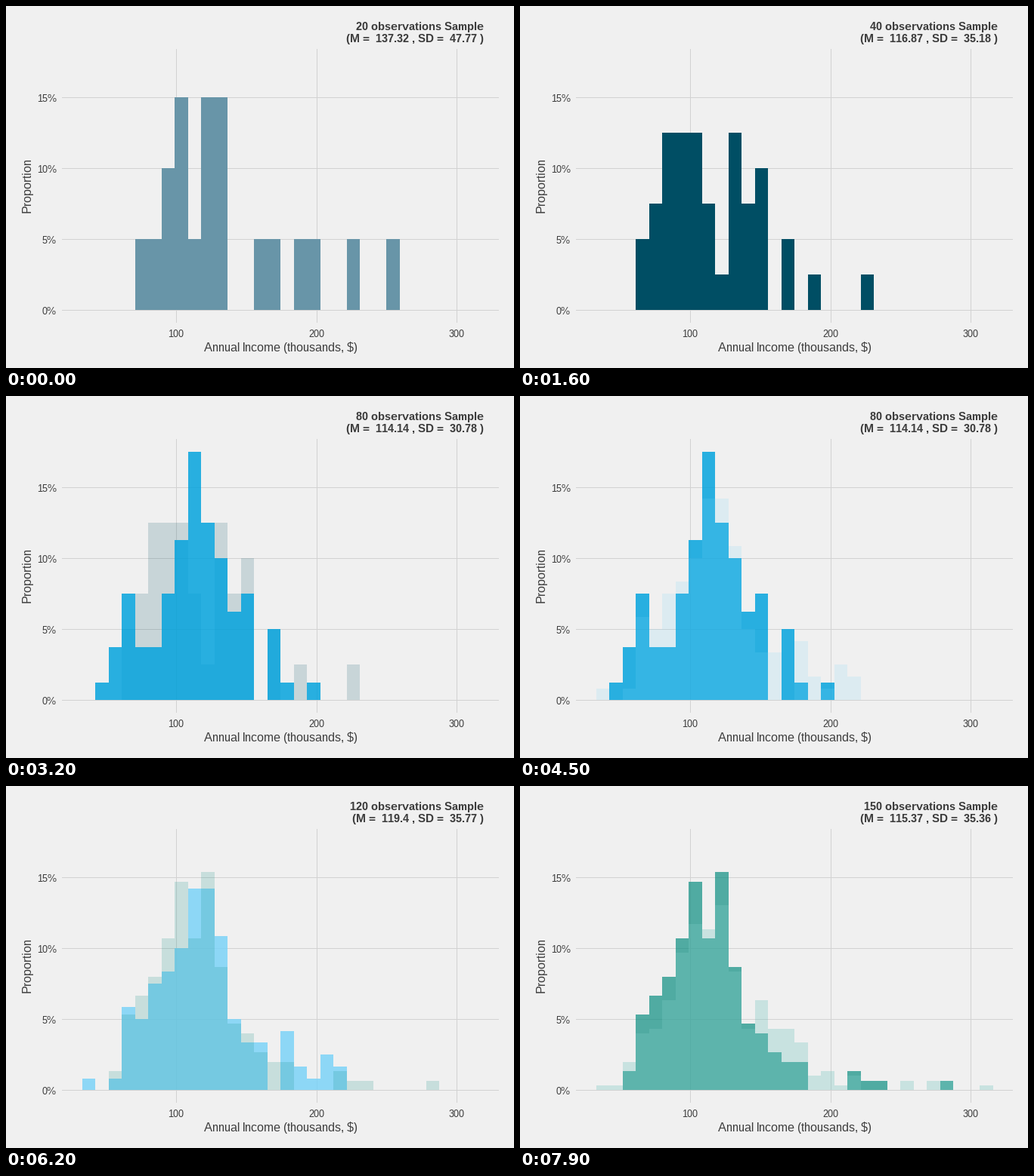
Write a matplotlib script that moves like this. It is 672x480 px and loops after 8000 ms.

```python
import matplotlib as mpl
import matplotlib.pyplot as plt
import numpy as np
from matplotlib.animation import FuncAnimation
from matplotlib.patches import Rectangle

mpl.rcParams.update({
    "font.family": "Liberation Sans",
    "text.hinting": "native",
    "text.hinting_factor": 1,
    "toolbar": "None",
})

W, H, DPI = 672, 480, 96
BG, GRID, INK = "#f0f0f0", "#d2d2d2", "#3c3c3c"
X0, BIN = 100.5, 17.5        # left edge of the first bin, bin width
Y0, PER = 403.25, 18.84      # zero line, pixels per percent
FPS_MS, FRAMES, FADE = 100, 80, 6
STARTS = [11, 28, 45, 62, 78]

# colour, size, mean, sd, first bin, counts per bin
SAMPLES = [
    ("#6895a8", 20, "137.32", "47.77", 4,
     "1 1 2 3 1 3 3 0 0 1 1 0 1 1 0 0 1 0 0 1"),
    ("#004e64", 40, "116.87", "35.18", 3,
     "2 3 5 5 5 3 1 5 3 4 0 2 0 1 0 0 0 1"),
    ("#00a2dd", 80, "114.14", "30.78", 1,
     "1 3 6 3 3 6 9 14 10 8 5 6 0 4 1 0 1"),
    ("#7ad3f8", 120, "119.4", "35.77", 0,
     "1 0 1 7 6 9 10 12 17 17 13 6 4 4 0 5 2 1 3 2"),
    ("#00897b", 150, "115.37", "35.36", 2,
     "2 8 10 12 16 22 16 23 13 7 6 4 3 3 0 0 0 2 1 1 0 0 0 0 1"),
    ("#7ac8c2", 300, "117.92", "41.26", 0,
     "1 1 6 12 13 19 29 35 34 39 25 13 19 13 13 10 3 4 1 3 0 0 0 2 0 2 2 0 0 1"),
]


def px(v):
    return np.floor(np.asarray(v) + 0.5)


fig = plt.figure(figsize=(W / DPI, H / DPI), dpi=DPI, facecolor=BG)
ax = fig.add_axes([0, 0, 1, 1])
ax.set_xlim(0, W)
ax.set_ylim(H, 0)
ax.axis("off")


def box(x, y, w, h, color, z):
    patch = Rectangle((x, y), w, h, facecolor=color, linewidth=0,
                      antialiased=False, zorder=z)
    return ax.add_patch(patch)


def label(x, y, text, size, **kw):
    return ax.text(x, y, text, fontsize=size * 72 / DPI, color=INK,
                   va=kw.pop("va", "baseline"), zorder=20, **kw)


for pct in (0, 5, 10, 15):
    y = px(Y0 - pct * PER)
    box(74, y, 578, 1, GRID, 1)
    label(67, y + 6, f"{pct}%", 13, ha="right")
for value, x in ((100, 225), (200, 411), (300, 596)):
    box(x, 57, 1, 363, GRID, 1)
    label(x, 439, str(value), 13, ha="center")

label(363, 458, "Annual Income (thousands, $)", 16, ha="center")
label(28.5, 238, "Proportion", 16, ha="center", va="center", rotation=90)
head = label(632, 32, "", 15, ha="right", weight="bold")
stats = label(632, 48, "", 15, ha="right", weight="bold")


def histogram(z, color, n, first, counts):
    bars = []
    for k, count in enumerate(map(int, counts.split()), first):
        if count:
            left, right = px(X0 + BIN * k), px(X0 + BIN * (k + 1))
            top = px(Y0 - 100 * count / n * PER)
            bars.append(box(left, top, right - left, 403 - top, color, z))
    return bars


charts = [histogram(2 + i, color, n, first, counts)
          for i, (color, n, _, _, first, counts) in enumerate(SAMPLES)]


def draw(frame):
    # fade[i] is how far sample i has come in
    fade = [1.0] + [min(max((frame - s + 1) / FADE, 0), 1) for s in STARTS]
    for i, bars in enumerate(charts):
        leaving = fade[i + 1] if i + 1 < len(fade) else 0
        alpha = fade[i] * (1 - leaving)
        for bar in bars:
            bar.set_alpha(alpha)
            bar.set_visible(alpha > 0)
    current = sum(f > 0.5 for f in fade) - 1
    _, n, mean, sd, _, _ = SAMPLES[current]
    head.set_text(f"{n} observations Sample")
    stats.set_text(f"(M =  {mean} , SD =  {sd} )")
    return []


anim = FuncAnimation(fig, draw, frames=FRAMES, init_func=lambda: draw(0),
                     interval=FPS_MS, repeat=True, repeat_delay=0)
plt.show()
```
